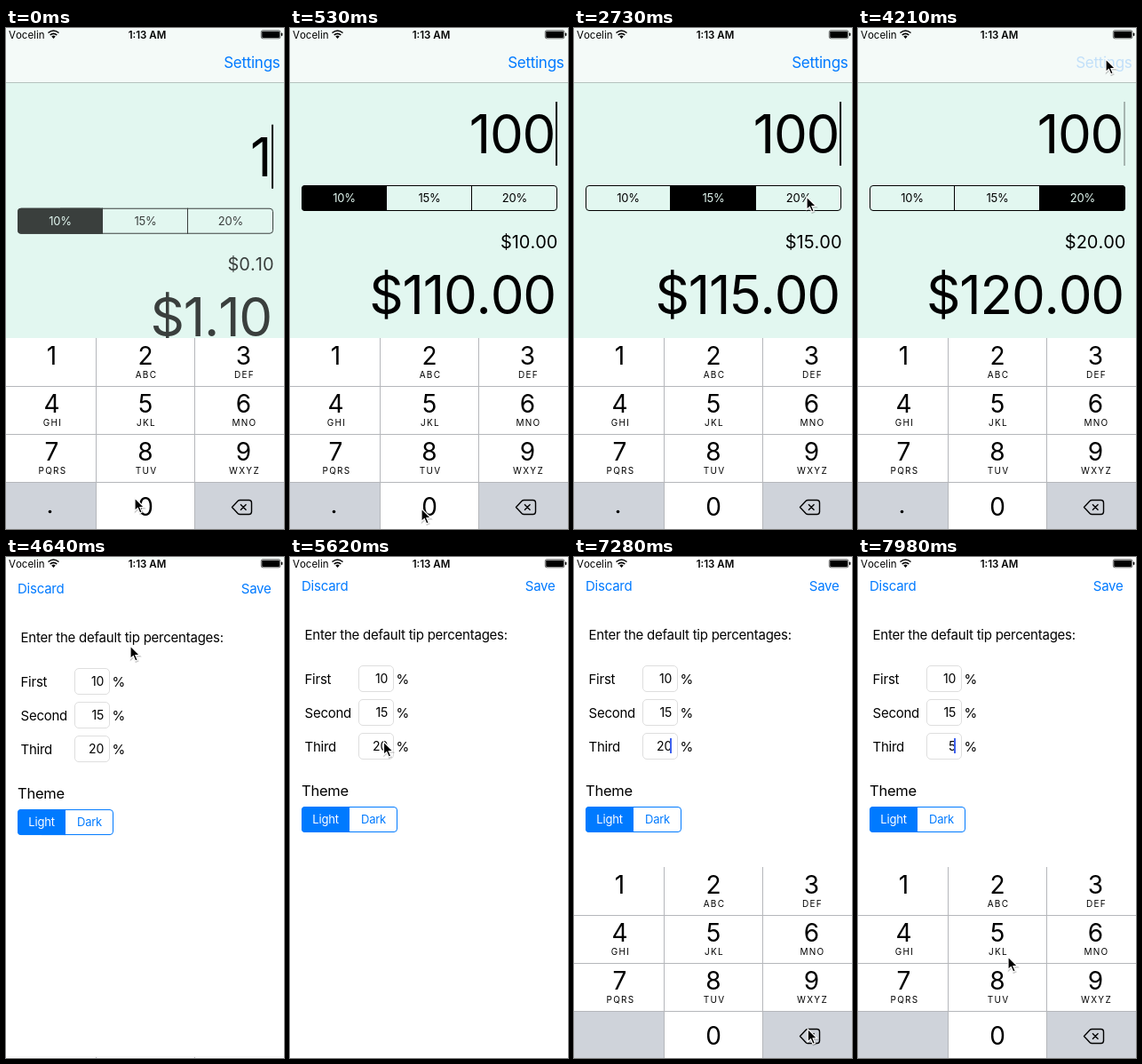
Write an HTML page that moves like this. It is 313 px wide and 564 px high and loops after 8000 ms.

```html
<!DOCTYPE html>
<html lang="en">
<head>
<meta charset="utf-8">
<title>Tip calculator</title>
<style>
  html, body { margin: 0; width: 100%; height: 100%; overflow: hidden; background: #fff; }
  svg { display: block; width: 100%; height: 100%; }
  text { font-family: Inter, sans-serif; font-optical-sizing: none; letter-spacing: -.016em; white-space: pre; }
  .big { letter-spacing: -.02em; font-kerning: none; }
  .plain { letter-spacing: 0; font-kerning: none; }
  .sub { letter-spacing: 1.3px; }
</style>
</head>
<body>
<svg id="stage" viewBox="0 0 313 564"></svg>
<script>
const LOOP = 8000;
const MINT = '#e2f7f0', BLUE = '#007aff', KEY_GRAY = '#cfd3da';
const MODAL_OPEN = 4240, KEYBOARD_BACK = 6090;
const stage = document.getElementById('stage');

// Value of the last [time, value] step that has begun
const stepAt = (steps, t) => steps.filter(s => s[0] <= t).pop()[1];
const within = (t, spans) => spans.some(([from, to]) => t >= from && t < to);
const clamp = v => Math.max(0, Math.min(1, v));

const AMOUNT = [[0, '1'], [260, '10'], [530, '100']];
const TIP = [[0, 0], [1750, 1], [2890, 2]];
const THIRD = [[0, '20'], [7390, '2'], [7540, ''], [7965, '5']];
const PRESSES = {
  '0': [[175, 260], [440, 530]],
  del: [[7330, 7400], [7480, 7550]],
  '5': [[7880, 7975]]
};
const POINTER = [
  [0, 145, 529], [350, 148, 541], [800, 148, 541], [1250, 126, 194], [1320, 131, 192],
  [1850, 131, 192], [2290, 260, 195], [2460, 260, 195], [2700, 262, 190], [2950, 262, 190],
  [3600, 276, 41], [3770, 279, 35], [4300, 279, 35], [4630, 140, 100], [4850, 140, 100],
  [5080, 90, 138], [5260, 92, 138], [5710, 107, 216], [5980, 109, 217], [7000, 109, 217],
  [7300, 265, 535], [7600, 265, 535], [7800, 169, 450], [LOOP, 169, 450]
];

// Remaining distance (1 to 0) of a critically damped spring
function spring(ms) {
  const x = Math.max(0, ms) * .0183;
  return (1 + x) * Math.exp(-x);
}

function blink(ms) {
  const phase = (ms % 1000) / 1000;
  return phase < .45 ? Math.pow(clamp(1 - phase / .33), 1.3) : clamp((phase - .45) / .2);
}

function text(str, x, y, size, { fill = '#000', anchor = 'start', cls = '', weight = 400 } = {}) {
  return `<text x="${x}" y="${y}" font-size="${size}" fill="${fill}" text-anchor="${anchor}" class="${cls}" font-weight="${weight}">${str}</text>`;
}

const rect = (x, y, w, h, fill, extra = '') =>
  `<rect x="${x}" y="${y}" width="${w}" height="${h}" fill="${fill}" ${extra}/>`;

const group = (content, y, opacity = 1) =>
  `<g transform="translate(0 ${y})" opacity="${opacity}">${content}</g>`;

function segments(labels, selected, x, y, width, color, back) {
  const w = width / labels.length, last = labels.length - 1, left = x + selected * w;
  let out = rect(left, y, w, 29, color, selected % last ? '' : 'rx="4"');
  if (selected === 0) out += rect(left + w / 2, y, w / 2, 29, color);
  if (selected === last) out += rect(left, y, w / 2, 29, color);
  out += rect(x + .5, y + .5, width - 1, 28, 'none', `rx="3.5" stroke="${color}"`);
  labels.forEach((label, i) => {
    if (i) out += rect(x + i * w - 1, y, 1, 29, color);
    out += text(label, x + (i + .5) * w, y + 19, 13,
      { fill: i === selected ? back : color, anchor: 'middle' });
  });
  return out;
}

function calculator(t) {
  const amount = stepAt(AMOUNT, t), choice = stepAt(TIP, t);
  const tip = amount * [.1, .15, .2][choice];
  const intro = clamp(1 - t / 200) ** 2;
  const caret = t < 1000 ? 1 : blink(t);
  const right = { anchor: 'end', cls: 'plain' }, bigRight = { anchor: 'end', cls: 'big' };
  const input = text(amount, 298.2, 141, 60, bigRight) +
    rect(299, 83, 2, 72, '#000', `opacity="${caret}"`);
  const results = segments(['10%', '15%', '20%'], choice, 13, 177, 288, '#000', MINT) +
    text('$' + tip.toFixed(2), 301.5, 247.5, 20, right) +
    text('$' + (+amount + tip).toFixed(2), 299, 321.5, 60, bigRight);
  return rect(0, 0, 313, 564, MINT) + rect(0, 0, 313, 61, '#f4faf8') + rect(0, 61, 313, 1, '#b5c3be') +
    group(text('Settings', 308.5, 45, 17, { fill: BLUE, anchor: 'end' }), 0, t >= 4030 ? .2 : 1) +
    group(input, 26 * intro) + group(results, 26 * intro, 1 - .26 * intro);
}

function settings(t) {
  const blue = { fill: BLUE };
  const third = stepAt(THIRD, t);
  let out = rect(0, 0, 313, 564, '#fff') +
    text('Discard', 13, 38, 15, blue) + text('Save', 298.5, 38, 15, { fill: BLUE, anchor: 'end' }) +
    text('Enter the default tip percentages:', 16.5, 93, 15);
  [['First', '10'], ['Second', '15'], ['Third', third]].forEach(([label, value], i) => {
    const y = 122 + i * 38;
    out += text(label, 16.5, y + 20.5, 15) + text('%', 119.5, y + 20.5, 15) +
      rect(77.5, y + .5, 39, 29, '#fff', 'rx="4.5" stroke="#dedede"') +
      text(value, 110, y + 20, 14, { anchor: 'end' });
  });
  if (t > 6100) {
    const alpha = t > 7390 ? 1 : blink(t - 5600);
    out += rect(108, 204, 2, 17, '#3f62ee', `opacity="${alpha}"`);
  }
  return out + text('Theme', 13, 268.5, 16.5) +
    segments(['Light', 'Dark'], 0, 13, 281, 108, BLUE, '#fff');
}

function keyboard(t) {
  const columns = [[0, 101, 51.5], [102, 110, 157], [213, 100, 267.5]];
  const letters = ['', 'ABC', 'DEF', 'GHI', 'JKL', 'MNO', 'PQRS', 'TUV', 'WXYZ'];
  const pressed = key => within(t, PRESSES[key] || []);
  const middle = { anchor: 'middle', cls: 'plain' };
  let out = rect(0, 349, 313, 215, '#b5b7bb');
  for (let i = 0; i < 12; i++) {
    const [x, w, center] = columns[i % 3], row = Math.floor(i / 3);
    const y = 349 + row * 54 + (row ? 1 : 0);
    const key = i < 9 ? String(i + 1) : ['dot', '0', 'del'][i - 9];
    const gray = key === 'dot' || key === 'del';
    out += rect(x, y, w, row ? 53 : 54, gray !== pressed(key) ? KEY_GRAY : '#fff');
    if (!gray) out += text(key, center, row === 3 ? 548.5 : 379 + row * 54, 28, middle);
    if (letters[i]) out += text(letters[i], center + 1, 394 + row * 54, 10, { anchor: 'middle', cls: 'sub' });
  }
  if (t < 5000) out += `<circle cx="49.5" cy="544.5" r="1.8"/>`;
  return out + `<path d="M254.5 539.5L261 532.5Q262 531.5 263.5 531.5H273.5Q276.5 531.5 276.5 534.5V544.5Q276.5 547.5 273.5 547.5H263.5Q262 547.5 261 546.5ZM264 536.3l6.5 6.5m0-6.5l-6.5 6.5" fill="none" stroke="#000" stroke-width="1.4" stroke-linejoin="round"/>`;
}

const STATUS = text('Vocelin', 3, 11.5, 11.5, { cls: 'plain' }) +
  text('1:13 AM', 159, 11.5, 11.5, { anchor: 'middle', weight: 600, cls: 'plain' }) +
  `<g fill="none" stroke="#000" stroke-width="1.6"><path d="M47.5 5.5Q53.5 .5 59.5 5.5M49.7 7.9Q53.5 4.7 57.3 7.9"/></g>
   <path d="M53.5 12L51.3 9.5Q53.5 7.7 55.7 9.5Z"/>` +
  rect(287.3, 2.8, 21.6, 9, 'none', 'rx="1.8" stroke="#000" stroke-width=".6"') +
  rect(288.2, 3.7, 19.8, 7.2, '#000', 'rx=".8"') + rect(309.8, 5.6, 1.5, 3.4, '#000', 'rx=".7"');

function pointer(t) {
  const i = POINTER.findIndex(p => p[0] > t);
  const [t0, x0, y0] = POINTER[i - 1], [t1, x1, y1] = POINTER[i];
  const k = (t - t0) / (t1 - t0), e = k * k * (3 - 2 * k);
  const shape = 'M0 0V14.5L3.3 11.5L5.7 17L8.2 16L5.9 10.5H10.5Z';
  return `<g transform="translate(${x0 + (x1 - x0) * e} ${y0 + (y1 - y0) * e})">
    <path d="${shape}" transform="translate(.5 1.2)" opacity=".2" stroke="#000" stroke-width="1.5"/>
    <path d="${shape}" stroke="#fff" stroke-width="1.2"/></g>`;
}

function draw(now) {
  const t = now % LOOP;
  const keyboardDrop = t < KEYBOARD_BACK
    ? 215 * (1 - spring(t - MODAL_OPEN))
    : 215 * spring(t - KEYBOARD_BACK);
  const modal = t < MODAL_OPEN ? '' : group(settings(t), 564 * spring(t - MODAL_OPEN));
  stage.innerHTML = calculator(t) + modal + group(keyboard(t), keyboardDrop) + STATUS + pointer(t);
}

const start = performance.now();
function tick() {
  draw(performance.now() - start);
  requestAnimationFrame(tick);
}
tick();
</script>
</body>
</html>
```
